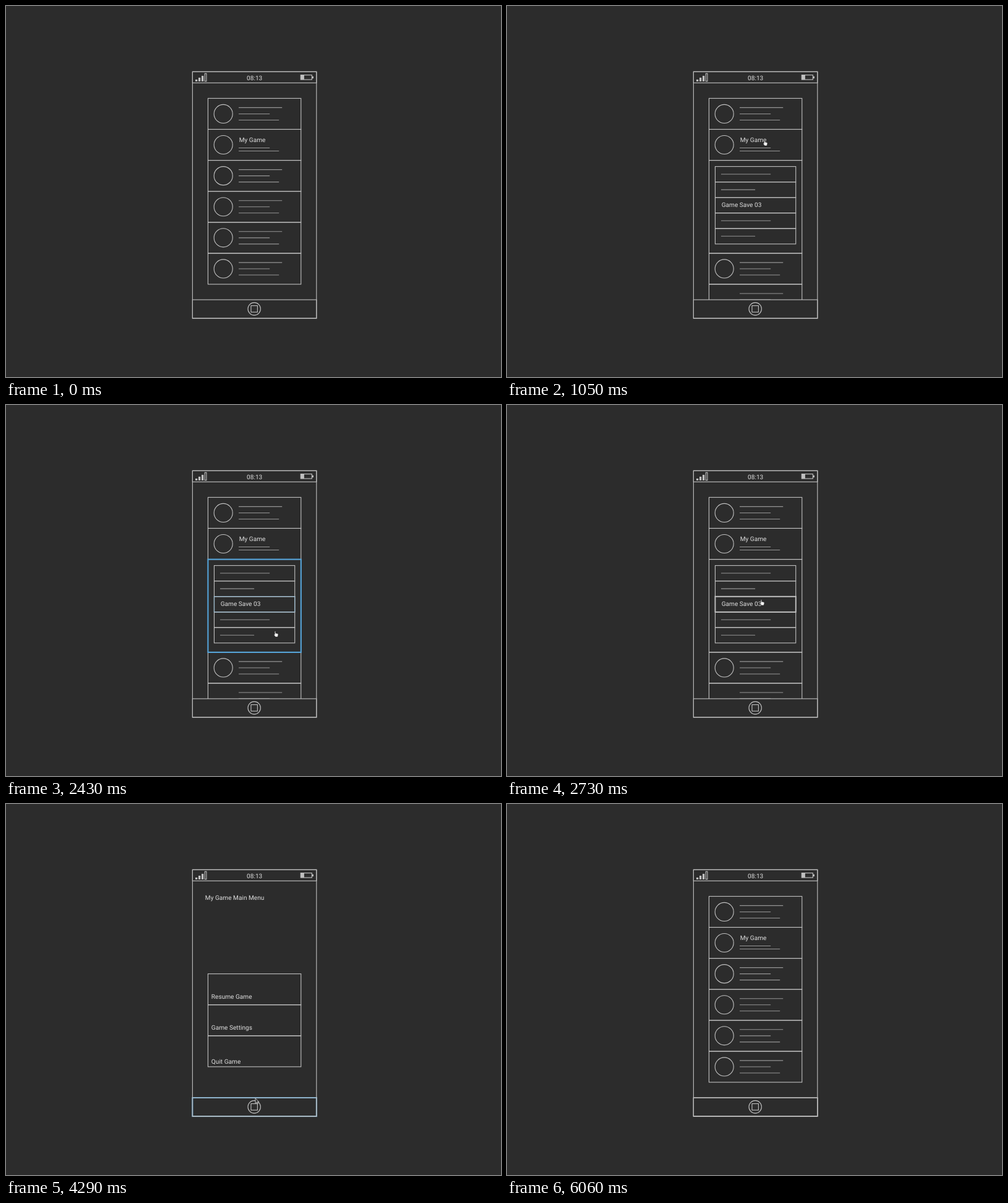
Write an HTML page that moves like this. It is 800 px wide and 600 px high and loops after 6.09 s.

```html
<!DOCTYPE html>
<html lang="en">
<head>
<meta charset="utf-8">
<title>Game save prototype</title>
<style>
  html, body { margin: 0; width: 100%; height: 100%; overflow: hidden; background: #2c2c2c; }
  svg { display: block; width: 100vw; height: 100vh; }
  text { font: 10.1px Roboto, sans-serif; fill: #dedede; stroke: none; text-rendering: geometricPrecision; }
</style>
</head>
<body>
<svg id="stage" viewBox="0 0 800 600" fill="none" stroke="#c0c0c0" stroke-width="1.1">
  <defs><clipPath id="screen"><rect x="1" y="18" width="198" height="350"/></clipPath></defs>
</svg>
<script>
const LOOP = 6090, STEP = 30, FLASH = 420, RING = 90;
const LINE = [192, 192, 192], BLUE = [82, 164, 219];
const stage = document.getElementById('stage');

function add(parent, tag, attrs, text) {
  const el = document.createElementNS('http://www.w3.org/2000/svg', tag);
  for (const key in attrs) el.setAttribute(key, attrs[key]);
  if (text) el.textContent = text;
  return parent.appendChild(el);
}
const group = (parent, attrs) => add(parent, 'g', attrs);
const rect = (p, x, y, width, height, more) => add(p, 'rect', { x, y, width, height, ...more });
const circle = (p, cx, cy, r) => add(p, 'circle', { cx, cy, r });
const label = (p, x, y, text) => add(p, 'text', { x, y }, text);
const dash = (p, x, y, w) => add(p, 'path', { d: `M${x} ${y}h${w}`, stroke: '#959595' });
const solid = { fill: '#c0c0c0', stroke: 'none' };

// The phone is drawn on its own 200 x 398 grid
const phone = group(stage, { transform: 'translate(301.4 106.3) scale(1.002)' });
const view = group(phone, { 'clip-path': 'url(#screen)' });
const glow = group(phone);

// Outlines that light up when the pointer enters
const flashes = [];
function flash(el, start) {
  flashes.push({ start, el: glow.appendChild(el.cloneNode()) });
}

const header = rect(phone, 0, 0, 200, 18);
const bar = rect(phone, 0, 368, 200, 30);
rect(phone, 0, 0, 200, 398);
for (let i = 1; i < 4; i++) rect(phone, i * 5 - .4, 15.6 - i * 3, 3.3, i * 3, solid);
rect(phone, 19.9, 2.9, 2.6, 12.5);
label(phone, 87.5, 13.2, '08:13');
rect(phone, 174.5, 5.3, 18, 7.4);
rect(phone, 174.5, 5.3, 5.6, 7.4, solid);
rect(phone, 192.7, 7.4, 2.4, 3.4, solid);
circle(phone, 99.6, 382.8, 10.2);
const home = rect(phone, 94.4, 377.6, 10.4, 10.4);

function listRow(parent, i, { title, cut } = {}) {
  const y = 43 + i * 50;
  if (!cut) circle(parent, 49.7, y + 25, 15);
  if (title) label(parent, 75.2, y + 20.4, title);
  [70, 50, 65].forEach((w, n) => {
    if (!title) dash(parent, 74.5, y + 15 + n * 10, w);
    else if (n) dash(parent, 74.5, y + 25 + n * 5, w);
  });
  return rect(parent, 25, y, 150, 50);
}

const [list, closed, open, menu] = Array.from({ length: 4 }, () => group(view));
const firstRow = listRow(list, 0);
const gameRow = listRow(list, 1, { title: 'My Game' });
for (let i = 2; i < 6; i++) listRow(closed, i);

const panel = rect(open, 25, 143, 150, 150);
const saves = Array.from({ length: 5 }, (_, i) => {
  const y = 153 + i * 25;
  if (i === 2) label(open, 45.2, y + 15.7, 'Game Save 03');
  else dash(open, 44.5, y + 12.4, i % 3 ? 55 : 80);
  return rect(open, 35, y, 130, 25);
});
// The fourth line is a long one like the first
listRow(open, 5);
listRow(open, 6, { cut: true });

label(menu, 20.4, 48.2, 'My Game Main Menu');
const items = ['Resume Game', 'Game Settings', 'Quit Game'].map((text, i) => {
  const y = 168 + i * 50;
  label(menu, 30.4, y + (i < 2 ? 40.2 : 45), text);
  return rect(menu, 25, y, 150, 50);
});

flash(header, 180);
flash(firstRow, 210);
flash(gameRow, 270);
flash(panel, 2280);
flash(saves[2], 2430);
flash(items[0], 3270);
flash(items[1], 3840);
flash(items[2], 3870);
flash(bar, 4080);
flash(home, 5010);
flash(bar, 5670);

const clicks = [750, 1500, 1710, 3240, 4980];
const ring = group(stage, { 'stroke-width': 1 });
circle(ring, 0, 0, 15.8);
circle(ring, 0, 0, 13.3);

const pointer = group(stage);
const hand = add(pointer, 'path', {
  d: 'M-.8 .2Q0-.8 .7 .2V3L4 3.8Q5.2 4.2 4.9 5.6L4 9H.4L-2 5.8Q-2.2 4.7-.8 5.2Z',
  fill: '#f2f2f2', stroke: '#1c1c1c', 'stroke-width': .5
});
const arrow = add(pointer, 'path', {
  d: 'M0 0V8.2L2 6.5L3.3 9.2L4.5 8.6L3.3 6H5.8Z',
  fill: '#2c2c2c', stroke: '#dcdcdc', 'stroke-width': .8
});

const clamp = v => Math.max(0, Math.min(1, v));
const mix = (a, b, k) => a + (b - a) * k;
const within = (t, a, b) => t >= a && t < b;
const show = (el, on) => el.setAttribute('display', on ? 'inline' : 'none');
const place = (el, x, y) => el.setAttribute('transform', `translate(${x} ${y})`);
const settle = k => 1 - (1 - k) ** 3;
const leave = k => k * k;

// Pointer moves, each from where the last one ended
const entry = [508, -20];
const moves = [
  { from: 90, to: 480, at: [416, 217], ease: settle },
  { from: 1980, to: 2100, at: [418, 218], ease: settle },
  { from: 2280, to: 2370, at: [468, 436], ease: settle },
  { from: 2370, to: 2610, at: [411, 315], ease: settle },
  { from: 3840, to: 4110, at: [404, 495], ease: settle },
  { from: 4110, to: 4290, at: [403, 475.8], ease: settle },
  { from: 4290, to: 4530, at: [402, 490], ease: settle },
  { from: 5640, to: 5900, at: [910, -10], ease: leave }
];
const tipAt = t => moves.reduce((tip, { from, to, at, ease }) => {
  const k = ease(clamp((t - from) / (to - from)));
  return tip.map((v, i) => mix(v, at[i], k));
}, entry);

function drawFlash({ start, el }, t) {
  const age = t - start, on = within(age, 0, FLASH);
  show(el, on);
  if (!on) return;
  const rise = clamp((age + STEP) / 90);
  const tint = Math.min(rise, clamp((300 - age) / 80));
  const weight = Math.min(rise, clamp((FLASH - age) / 150));
  el.setAttribute('stroke', `rgb(${LINE.map((c, i) => Math.round(mix(c, BLUE[i], tint)))})`);
  el.setAttribute('stroke-width', mix(1.1, 2, weight));
}

function draw(t) {
  const inMenu = within(t, 3270, 5010);
  const isOpen = within(t, 780, 1530) || within(t, 1740, 3270);
  show(menu, inMenu);
  show(list, !inMenu);
  show(open, isOpen);
  show(closed, !inMenu && !isOpen);
  flashes.forEach(f => drawFlash(f, t));

  const [x, y] = tipAt(t);
  const overRow = within(x, 326, 477) && within(y, inMenu ? 274 : 149, inMenu ? 425 : 450);
  const overHome = Math.hypot(x - 401, y - 490) < 6;
  show(hand, overRow || overHome);
  show(arrow, !overRow && !overHome);
  show(ring, clicks.some(c => within(t, c, c + RING)));
  place(pointer, x, y);
  place(ring, x + .6, y + .2);
}

function tick() {
  draw(Math.floor(performance.now() % LOOP / STEP) * STEP);
  requestAnimationFrame(tick);
}
tick();
</script>
</body>
</html>
```
